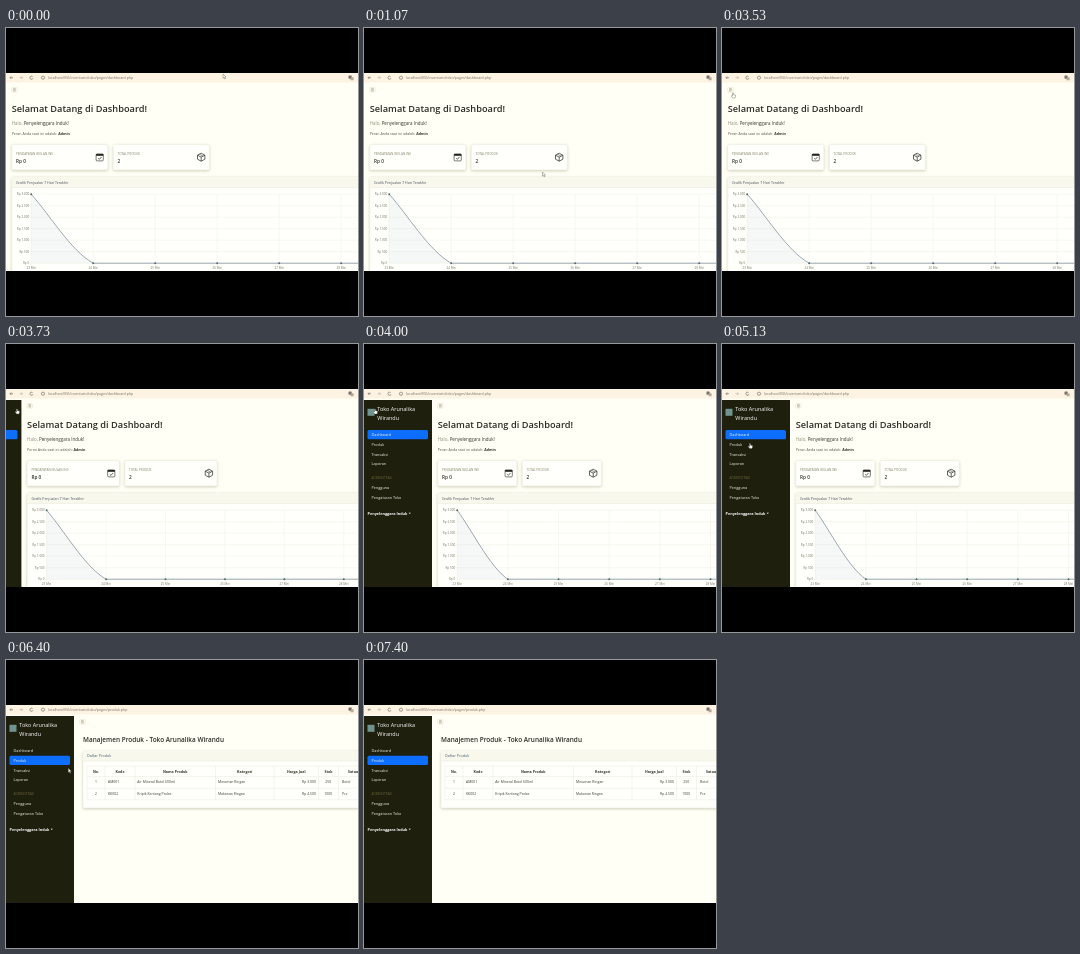
Recreate the animation shown at these times as an HTML page with a canvas. Size 352x288 px, loop 8000 ms.

```html
<!DOCTYPE html>
<html lang="id">
<head>
<meta charset="utf-8">
<title>Dashboard toko</title>
<style>
  html, body { margin: 0; width: 100%; height: 100%; overflow: hidden; background: #000; }
  canvas { display: block; width: 352px; height: 288px; }
</style>
</head>
<body>
<canvas id="stage"></canvas>
<script>
const LOOP = 8000, W = 352, H = 288, TOP = 45, BOTTOM = 243, SIDEBAR = 68;
const SHOP = ['Toko Arunalika', 'Wirandu'], USER = 'Penyelenggara Induk';
const INK = '#33332a', PAGE = '#fffff5', LINE = '#ecece0', BLUE = '#0d6efd';
const SLIDE_START = 3630, SLIDE_TIME = 300, PAGE_CHANGE = 5200;

const canvas = document.getElementById('stage');
const ctx = canvas.getContext('2d');
const dpr = window.devicePixelRatio || 1;
canvas.width = W * dpr;
canvas.height = H * dpr;

const clamp = v => Math.max(0, Math.min(1, v));
const easeInOut = t => t < 0.5 ? 2 * t * t : 1 - 2 * (1 - t) * (1 - t);

// Laid out at ten times the size so that small glyph advances are not rounded.
function text(str, x, y, size, color = INK, weight = 400, align = 'left') {
  ctx.save();
  ctx.translate(x, y);
  ctx.scale(0.1, 0.1);
  ctx.font = `${weight} ${size * 10}px "Open Sans", "Noto Sans", sans-serif`;
  ctx.textAlign = align;
  ctx.fillStyle = color;
  ctx.fillText(str, 0, 0);
  const width = ctx.measureText(str).width / 10;
  ctx.restore();
  return width;
}

function rect(x, y, w, h, color) {
  ctx.fillStyle = color;
  ctx.fillRect(x, y, w, h);
}

function line(points, color, width = 0.6) {
  ctx.beginPath();
  points.forEach(([x, y]) => ctx.lineTo(x, y));
  ctx.strokeStyle = color;
  ctx.lineWidth = width;
  ctx.stroke();
}

function round(x, y, w, h, r, fill, stroke) {
  ctx.beginPath();
  ctx.roundRect(x, y, w, h, r);
  if (fill) { ctx.fillStyle = fill; ctx.fill(); }
  if (stroke) { ctx.strokeStyle = stroke; ctx.lineWidth = 0.6; ctx.stroke(); }
}

function card(x, y, w, h) {
  ctx.save();
  ctx.shadowColor = 'rgba(70,70,30,.28)';
  ctx.shadowBlur = 3 * dpr;
  ctx.shadowOffsetY = 1 * dpr;
  round(x, y, w, h, 1.5, '#fffffb');
  ctx.restore();
  round(x, y, w, h, 1.5, null, LINE);
}

function browserBar(page) {
  rect(0, TOP, W, 9.5, '#fdf3e2');
  const c = '#6c6257';
  line([[7, 49.7], [4, 49.7]], c);
  line([[5.3, 48.4], [4, 49.7], [5.3, 51]], c);
  line([[13.5, 49.7], [16.5, 49.7]], '#b9ad9e');
  line([[15.2, 48.4], [16.5, 49.7], [15.2, 51]], '#b9ad9e');
  ctx.strokeStyle = c;
  ctx.lineWidth = 0.6;
  ctx.beginPath();
  ctx.arc(25.5, 49.7, 1.6, 0.3, 5.5);
  ctx.stroke();
  ctx.beginPath();
  ctx.arc(37, 49.7, 1.6, 0, 7);
  ctx.stroke();
  text('localhost/KSI/inventaris/toko/pages/' + page + '.php', 42, 51.1, 3.55, '#806f63');
  round(342.5, 47.5, 3.2, 3.2, 0.4, '#77706b');
  round(344.6, 49.3, 3, 3, 0.4, '#b6a69a');
}

function menuButton(x) {
  round(x, 59.5, 5.4, 4.6, 1, null, '#e6e2cf');
  [60.7, 61.8, 62.9].forEach(y => line([[x + 1.3, y], [x + 4.1, y]], '#8c8466', 0.5));
}

function calendarIcon(x, y) {
  round(x - 3.6, y - 3.3, 7.2, 7, 1, null, '#25251e');
  rect(x - 3.6, y - 3.2, 7.2, 1.8, '#25251e');
  line([[x - 1.5, y + 1], [x - 0.3, y + 2.1], [x + 1.8, y - 0.2]], '#25251e', 0.7);
}

function boxIcon(x, y) {
  const c = '#25251e';
  line([[x, y - 4], [x + 3.7, y - 2], [x + 3.7, y + 2], [x, y + 4],
        [x - 3.7, y + 2], [x - 3.7, y - 2], [x, y - 4]], c, 0.7);
  line([[x - 3.7, y - 2], [x, y - 0.1], [x + 3.7, y - 2]], c, 0.7);
  line([[x, y], [x, y + 4]], c, 0.7);
  line([[x - 1.8, y - 3], [x + 1.8, y - 1.1]], c, 0.5);
}

function statCard(x, w, label, value, icon) {
  card(x, 116.5, w, 25.5);
  text(label, x + 4.3, 126.8, 3.1, '#85856c');
  text(value, x + 4.3, 135, 4.7, INK, 600);
  icon(x + w - 8.2, 129.2);
}

function chart(x, step) {
  const y0 = 235.2, y1 = 166.2, gap = (y0 - y1) / 6;
  for (let i = 0; i < 7; i++) {
    const y = y0 - gap * i, px = x + step * i;
    line([[x - 1.5, y], [x + step * 6, y]], '#f0f0e4', 0.5);
    line([[px, y1], [px, y0 + 1.5]], '#f0f0e4', 0.5);
    const value = i * 500;
    const label = value < 1000 ? String(value) : (value / 1000).toFixed(3).replace('.', '.');
    text('Rp ' + label, x - 2, y + 1.1, 3.05, '#77776a', 400, 'right');
    text(23 + i + ' Mei', px, 240.8, 3.05, '#77776a', 400, 'center');
  }
  const curve = () => {
    ctx.beginPath();
    ctx.moveTo(x, y1);
    ctx.bezierCurveTo(x + step * 0.3, y1 + 20.7, x + step * 0.64, y0 - 12.4, x + step, y0);
    ctx.lineTo(x + step * 6, y0);
  };
  curve();
  ctx.lineTo(x, y0);
  ctx.fillStyle = 'rgba(78,115,180,.05)';
  ctx.fill();
  curve();
  ctx.strokeStyle = '#7b8d98';
  ctx.lineWidth = 0.75;
  ctx.stroke();
  for (let i = 0; i < 7; i++) {
    ctx.beginPath();
    ctx.arc(x + step * i, i ? y0 : y1, 1, 0, 7);
    ctx.fillStyle = '#4d6c70';
    ctx.fill();
  }
}

function dashboard(shift) {
  const x = 5.7 + shift, pitch = 101.5 - shift / 4;
  menuButton(x);
  text('Selamat Datang di Dashboard!', x, 84.2, 9.25, '#2b2b24', 600);
  const w = text('Halo, ', x, 97.2, 4.5, '#8d8d74');
  text(USER + '!', x + w, 97.2, 4.5);
  const w2 = text('Peran Anda saat ini adalah: ', x, 107, 3.6, '#55554a');
  text('Admin', x + w2, 107, 3.6, INK, 700);

  statCard(x, pitch - 5.3, 'PENDAPATAN (BULAN INI)', 'Rp 0', calendarIcon);
  statCard(x + pitch, pitch - 5.3, 'TOTAL PRODUK', '2', boxIcon);

  card(x, 149, 406 - shift, 110);
  rect(x, 149, 406 - shift, 10.5, '#f8f8ec');
  line([[x, 159.5], [x + 406, 159.5]], LINE);
  text('Grafik Penjualan 7 Hari Terakhir', x + 4.3, 155.6, 3.55, '#4b5560');
  chart(x + 19.5, 62 - shift / 6);
}

function products() {
  menuButton(73.7);
  text('Manajemen Produk - ' + SHOP.join(' '), 77, 81.7, 6.45, '#2b2b24', 600);
  card(77, 91, 330, 57);
  rect(77, 91, 330, 10, '#f8f8ec');
  line([[77, 101], [W, 101]], LINE);
  text('Daftar Produk', 81, 97.4, 3.7, '#4a5f7c');

  [106.2, 116.6, 128.2, 139.8].forEach(y => line([[81, y], [W, y]], '#e9e9dc', 0.5));
  const edges = [81, 99, 129, 209.5, 268, 312.5, 332.5];
  edges.forEach(x => line([[x, 106.2], [x, 139.8]], '#e9e9dc', 0.5));
  ['No.', 'Kode', 'Nama Produk', 'Kategori', 'Harga Jual', 'Stok', 'Satuan'].forEach((name, i) => {
    const right = edges[i + 1] || 364;
    text(name, (edges[i] + right) / 2, 112.5, 3.6, INK, 700, 'center');
  });
  const rows = [
    ['1', 'AM001', 'Air Mineral Botol 600ml', 'Minuman Ringan', 'Rp 3.000', '250', 'Botol'],
    ['2', 'KK002', 'Kripik Kentang Pedas', 'Makanan Ringan', 'Rp 4.500', '1000', 'Pcs']
  ];
  const places = [90, 102, 131.3, 212, 310, 322.3, 336];
  const aligns = ['center', 'left', 'left', 'left', 'right', 'center', 'left'];
  rows.forEach((row, r) => row.forEach((cell, i) =>
    text(cell, places[i], 123.4 + r * 11.7, 3.45, '#3f3f35', 400, aligns[i])));
}

function sidebar(shift, active) {
  ctx.save();
  ctx.translate(shift - SIDEBAR, 0);
  rect(0, 56, SIDEBAR, BOTTOM - 56, '#1f1f0e');
  rect(3.5, 64.8, 7, 7, '#6f9490');
  text(SHOP[0], 13.3, 67.3, 5.5, '#fff', 500);
  text(SHOP[1], 13.3, 75.8, 5.5, '#fff', 500);
  round(3.5, 86 + active * 9.8, 60.5, 9.2, 1.5, BLUE);
  ['Dashboard', 'Produk', 'Transaksi', 'Laporan'].forEach((name, i) =>
    text(name, 7.5, 92 + i * 9.8, 3.8, '#f4f4ea'));
  text('ADMINISTRASI', 7.5, 135.2, 3.05, '#66663a');
  text('Pengguna', 7.5, 145, 3.8, '#f4f4ea');
  text('Pengaturan Toko', 7.5, 154.7, 3.8, '#f4f4ea');
  const w = text(USER, 3.5, 170.8, 3.8, '#fff', 700);
  ctx.beginPath();
  ctx.moveTo(w + 4.7, 168.8);
  ctx.lineTo(w + 6.9, 168.8);
  ctx.lineTo(w + 5.8, 170);
  ctx.fillStyle = '#fff';
  ctx.fill();
  ctx.restore();
}

// time, x, y
const path = [
  [70, 217, 46], [870, 182, 140], [930, 182, 140], [1070, 178.5, 144], [2270, 178.5, 144],
  [2530, 36.5, 62], [2800, 36.5, 62], [3200, 10.5, 65], [4130, 10.5, 65], [4730, 27.5, 99.5],
  [6270, 27.5, 99.5], [6700, 215, 147], [7000, 267, 77], [7200, 267, 77], [7400, 355, 66]
];

function pointerAt(t) {
  const next = path.findIndex(p => p[0] > t);
  if (next === 0) return path[0].slice(1);
  if (next < 0) return path[path.length - 1].slice(1);
  const [t0, x0, y0] = path[next - 1], [t1, x1, y1] = path[next];
  const k = easeInOut(clamp((t - t0) / (t1 - t0)));
  return [x0 + (x1 - x0) * k, y0 + (y1 - y0) * k];
}

function pointer(t) {
  const [x, y] = pointerAt(t);
  const hand = (t > 3130 && t < 4200) || (t > 4650 && t < 6320);
  ctx.save();
  ctx.translate(x, y);
  ctx.beginPath();
  if (hand) {
    [[0, 0], [0.9, 0], [1, 1.7], [3, 2.1], [3, 3.8], [2.4, 5], [0.2, 5],
     [-1.3, 3], [-0.8, 2.5], [0, 3]].forEach(p => ctx.lineTo(...p));
  } else {
    [[0, 0], [0, 4.2], [1, 3.3], [1.7, 4.9], [2.4, 4.6], [1.7, 3.1], [3, 3]]
      .forEach(p => ctx.lineTo(...p));
  }
  ctx.closePath();
  ctx.fillStyle = '#fff';
  ctx.fill();
  ctx.strokeStyle = '#55554c';
  ctx.lineWidth = 0.4;
  ctx.stroke();
  ctx.restore();
}

function draw(t) {
  const shift = SIDEBAR * easeInOut(clamp((t - SLIDE_START) / SLIDE_TIME));
  const onProducts = t >= PAGE_CHANGE;
  ctx.setTransform(dpr, 0, 0, dpr, 0, 0);
  rect(0, 0, W, H, '#000');
  ctx.save();
  ctx.beginPath();
  ctx.rect(0, TOP, W, BOTTOM - TOP);
  ctx.clip();
  rect(0, TOP, W, BOTTOM - TOP, PAGE);
  if (onProducts) products(); else dashboard(shift);
  if (shift > 0) sidebar(shift, onProducts ? 1 : 0);
  browserBar(onProducts ? 'produk' : 'dashboard');
  pointer(t);
  ctx.restore();
}

const start = performance.now();
function tick() {
  draw((performance.now() - start) % LOOP);
  requestAnimationFrame(tick);
}
draw(0);
requestAnimationFrame(tick);
</script>
</body>
</html>
```
